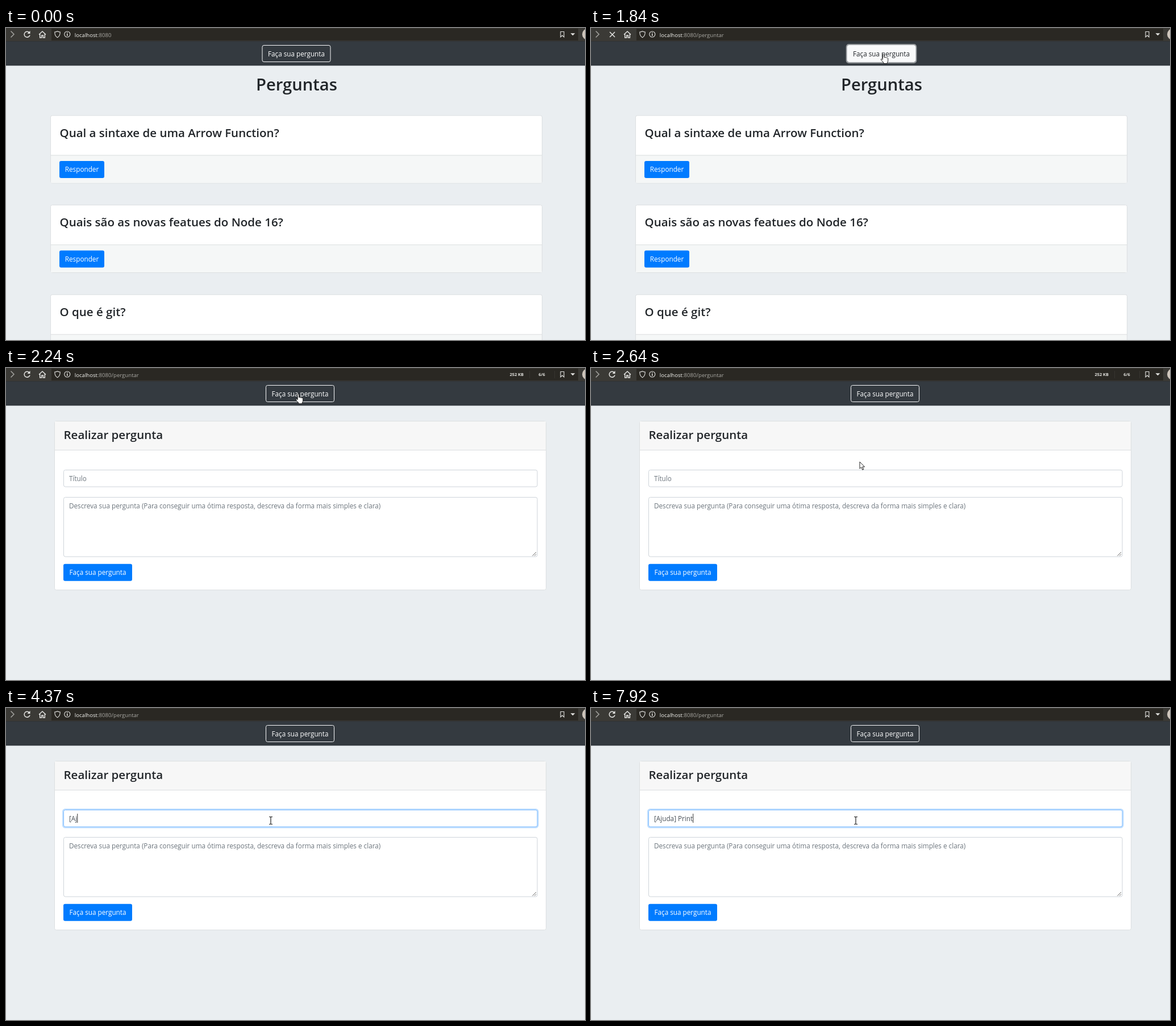
Animation, 1019 px wide and 549 px high, one loop 8000 ms. Source, as an HTML page:

```html
<!DOCTYPE html>
<html lang="pt">
<head>
<meta charset="utf-8">
<title>Perguntas</title>
<style>
  html, body { margin: 0; width: 100%; height: 100%; overflow: hidden; background: #eaeef1; }
  svg { display: block; width: 100%; height: 100%; }
  text { font-family: "Open Sans", "Noto Sans", sans-serif; font-size: 11.72px; white-space: pre; }
  .h { font-weight: 600; fill: #212529; }
  .mid { text-anchor: middle; }
  .line { fill: none; stroke: #e4e4e2; stroke-width: 1.5; }
  .stat { font-size: 7.4px; font-weight: 700; fill: #e2e2de; }
</style>
</head>
<body>
<svg id="stage" viewBox="0 0 1019 549" preserveAspectRatio="none"></svg>
<script>
const stage = document.getElementById('stage');
const rect = (x, y, w, h, fill, more = '') =>
  `<rect x="${x}" y="${y}" width="${w}" height="${h}" fill="${fill}" ${more}/>`;
const text = (x, y, s, more = '') => `<text x="${x}" y="${y}" ${more}>${s}</text>`;
const path = (d, more = 'class="line"') => `<path d="${d}" ${more}/>`;
const edge = c => `rx="3" stroke="${c}"`;
const blueButton = (x, y, w, s) =>
  rect(x, y, w, 30, '#007bff', 'rx="3"') +
  text(x + w / 2, y + 19.2, s, 'class="mid" fill="#fff"');

const card = (y, title) =>
  rect(78.5, y + .5, 865, 119, '#fff', edge('#dcdfe1')) +
  rect(79, y + 70, 864, 49, '#f5f7f7') +
  rect(79, y + 70, 864, 1, '#dcdfe0') +
  text(94.5, y + 38.3, title, 'class="h" style="font-size:20.5px"') +
  blueButton(94, y + 80.5, 79, 'Responder');

const browser =
  rect(0, 0, 1019, 24, '#3b3a36') +
  rect(80, 1, 927, 21, '#2a2823') +
  rect(0, 23, 1019, 1, '#2f3235') +
  path('M8.5 5.5l5.5 5.5l-5.5 5.5', 'class="line" style="stroke:#a2a19d"') +
  `<g id="reload">${path('M41 8A5 5 0 1 0 42 12.5')}${path('M42.5 5v5h-5z', 'fill="#e4e4e2"')}</g>` +
  path('M33 7l9 9M42 7l-9 9', 'id="cancel" class="line"') +
  path('M58 11.5l6-5.5l6 5.5M59.7 10.5v6.5h3v-4h2.6v4h3v-6.5') +
  path('M90.5 5.8q2.5 1.4 4.7 1.2q.3 7-4.7 9.7q-5-2.7-4.7-9.7q2.2.2 4.7-1.2z', 'class="line" style="stroke-width:1.1"') +
  '<circle cx="107.8" cy="11" r="5" class="line" style="stroke-width:1.1"/>' +
  path('M107.8 10v4M107.8 7.8v1.2') +
  text(120.8, 15.5, '<tspan fill="#f4f4f0">localhost</tspan><tspan fill="#a9a8a3">:8080<tspan id="route">/perguntar</tspan></tspan>', 'style="font-size:9.6px"') +
  '<g id="stats">' + text(886.5, 14.2, '252 KB', 'id="kb" class="stat"') +
  text(943, 14.2, '4/6', 'id="count" class="stat mid"') +
  rect(921, 5, 1, 13, '#37352f') + rect(965, 5, 1, 13, '#37352f') + '</g>' +
  path('M976 6.5h6v9.5l-3-3l-3 3z', 'class="line" style="stroke-width:1.1"') +
  path('M993.5 9.3h8l-4 4z', 'fill="#e4e4e2"') +
  '<circle cx="1024" cy="11" r="10" fill="#cfc6bc"/>';

const nav =
  rect(0, 24, 1019, 42.3, '#343a40') +
  '<g id="nav">' +
  rect(-61.2, 29.2, 122.4, 32, 'none', 'id="ring" rx="4" stroke="#969a9d" stroke-width="2.2"') +
  rect(-60, 30.5, 120, 29, '#343a40', 'id="navBox" rx="3" stroke="#f8f9fa"') +
  text(0, 49.9, 'Faça sua pergunta', 'id="navText" class="mid"') + '</g>';

const list = '<g id="list">' +
  text(511.5, 109.6, 'Perguntas', 'class="h mid" style="font-size:29.2px"') +
  card(153.5, 'Qual a sintaxe de uma Arrow Function?') +
  card(311, 'Quais são as novas featues do Node 16?') +
  card(468.7, 'O que é git?') + '</g>';

const form = '<g id="form">' +
  rect(85.5, 93.5, 865, 297, '#fff', edge('#dcdfe1')) +
  rect(86, 94, 864, 50.5, '#f7f7f7') +
  rect(86, 144, 864, 1, '#dcdfe0') +
  text(101.5, 124.7, 'Realizar pergunta', 'class="h" style="font-size:20.5px"') +
  rect(100.2, 178.3, 836, 32, 'none', 'id="glow" rx="4" stroke="#bfdeff" stroke-width="2.6"') +
  rect(101.5, 179.5, 833.5, 29.5, '#fff', 'id="field" ' + edge('#ced4da')) +
  text(111, 198.8, 'Título', 'id="hint" fill="#6c757d"') +
  text(111, 198.8, '', 'id="typed" fill="#495057"') +
  rect(0, 186, 1, 16, '#333', 'id="caret"') +
  rect(101.5, 227.5, 833.5, 104.5, '#fff', edge('#ced4da')) +
  text(111, 247.2, 'Descreva sua pergunta (Para conseguir uma ótima resposta, descreva da forma mais simples e clara)', 'fill="#6c757d"') +
  path('M926.5 330.5l6.5-6.5M930 330.5l3-3', 'stroke="#666" fill="none"') +
  blueButton(101, 344.7, 121, 'Faça sua pergunta') +
  '<g id="popup">' + rect(101.5, 210, 232, 41, '#000', 'rx="3" opacity=".25"') +
  rect(102, 210, 231, 40, '#4a4a4a', 'rx="2"') +
  text(111, 233.8, 'Como eu faço para printar algo no console?', 'fill="#f2f2f2" style="font-size:9.5px;font-weight:600"') +
  '</g></g>';

const outline = 'fill="#fff" stroke="#222" stroke-width="1" stroke-linejoin="round"';
const cursors = '<g id="cursor">' +
  path('M0 0v12l2.8-2.5l2 4.6l2-.9l-2-4.4h3.8z', 'id="arrow" ' + outline) +
  path('M-1.2 10V1.2q1.3-2 2.5 0V6q1.2-.7 2.3.4q1.4-.7 2.3.5q1.7-.6 2.3 1V12q0 2-1.5 3.5v1.5H0.5v-1.5L-4 10.5q-.3-2 1.4-1.6z', 'id="hand" ' + outline) +
  path('M-3 -6.5h2.2l.8.8l.8-.8H3M0 -6v12M-3 6.5h2.2l.8-.8l.8.8H3', 'id="beam" fill="none" stroke="#222" stroke-width="1.2"') + '</g>';

stage.innerHTML = rect(0, 0, 1019, 549, '#eaeef1') + list + form + nav + browser + cursors;

const $ = id => document.getElementById(id);
const show = (id, on) => $(id).setAttribute('display', on ? 'inline' : 'none');
const set = (id, key, value) => $(id).setAttribute(key, value);
const clamp = v => Math.max(0, Math.min(1, v));
const mix = (a, b, u) => `rgb(${a.map((v, i) => Math.round(v + (b[i] - v) * u))})`;

// time, x, y of the pointer
const route = [[320, 906, 538], [600, 735, 300], [880, 550, 96], [1020, 508.5, 50],
  [1150, 514.5, 45.5], [2240, 514.5, 45.5], [2640, 473, 165], [2900, 465, 195], [3030, 466, 198]];
// time and content of the title field
const typing = [[0, ''], [3690, '['], [4030, '[A'], [4370, '[Aj'], [4440, '[Aju'], [4590, '[Ajud'],
  [4780, '[Ajuda'], [5250, '[Ajuda~'], [6190, '[Ajuda'], [6530, '[Ajuda]'], [7000, '[Ajuda] '],
  [7520, '[Ajuda] P'], [7620, '[Ajuda] Pr'], [7710, '[Ajuda] Pri'], [7860, '[Ajuda] Prin'], [7920, '[Ajuda] Print']];
const latest = (keys, t) => keys.filter(k => k[0] <= t).pop() || keys[0];

function pointer(t) {
  const a = latest(route, t), b = route[route.indexOf(a) + 1] || a;
  const u = a === b ? 0 : clamp((t - a[0]) / (b[0] - a[0]));
  return [a[1] + (b[1] - a[1]) * u, a[2] + (b[2] - a[2]) * u];
}

function draw(t) {
  const asking = t >= 2240, loading = t >= 1750 && !asking, focused = t >= 3170;
  show('list', !asking);
  show('form', asking);
  show('reload', !loading);
  show('cancel', loading);
  show('route', t >= 1820);
  show('stats', t >= 1890 && t < 4100);
  $('count').textContent = asking ? '6/6' : '4/6';
  set('kb', 'opacity', 1 - .8 * clamp((t - 3690) / 400));
  set('count', 'opacity', 1 - clamp((t - 3830) / 270));

  const lit = asking ? 0 : clamp((t - 975) / 150) ** 1.05;
  set('nav', 'transform', `translate(${asking ? 517.5 : 511} 0)`);
  set('navBox', 'fill', mix([52, 58, 64], [248, 249, 250], lit));
  set('navText', 'fill', mix([255, 255, 255], [33, 37, 41], lit));
  show('ring', loading);

  const step = 320 + Math.floor((t - 320) / 70) * 70;
  const [x, y] = pointer(t < 1150 ? step : t);
  const overButton = t >= 960 && y < 60, overField = asking && y > 180;
  show('cursor', t >= 320);
  set('cursor', 'transform', `translate(${x} ${y})`);
  show('hand', overButton);
  show('beam', overField);
  show('arrow', !overButton && !overField);

  const value = latest(typing, t)[1];
  show('glow', focused);
  set('field', 'stroke', focused ? '#80bdff' : '#ced4da');
  show('hint', !value);
  if ($('typed').textContent !== value) $('typed').textContent = value;
  show('caret', focused && !(t >= 5790 && t < 6330));
  if (asking) set('caret', 'x', 111 + (value ? $('typed').getComputedTextLength() : 0));
  const fadeIn = clamp((t - 3170) / 130), fadeOut = clamp((t - 3760) / 220);
  set('popup', 'opacity', fadeIn * (1 - fadeOut ** 2));
}

const start = performance.now();
function tick() {
  draw((performance.now() - start) % 8000);
  requestAnimationFrame(tick);
}
tick();
</script>
</body>
</html>
```
